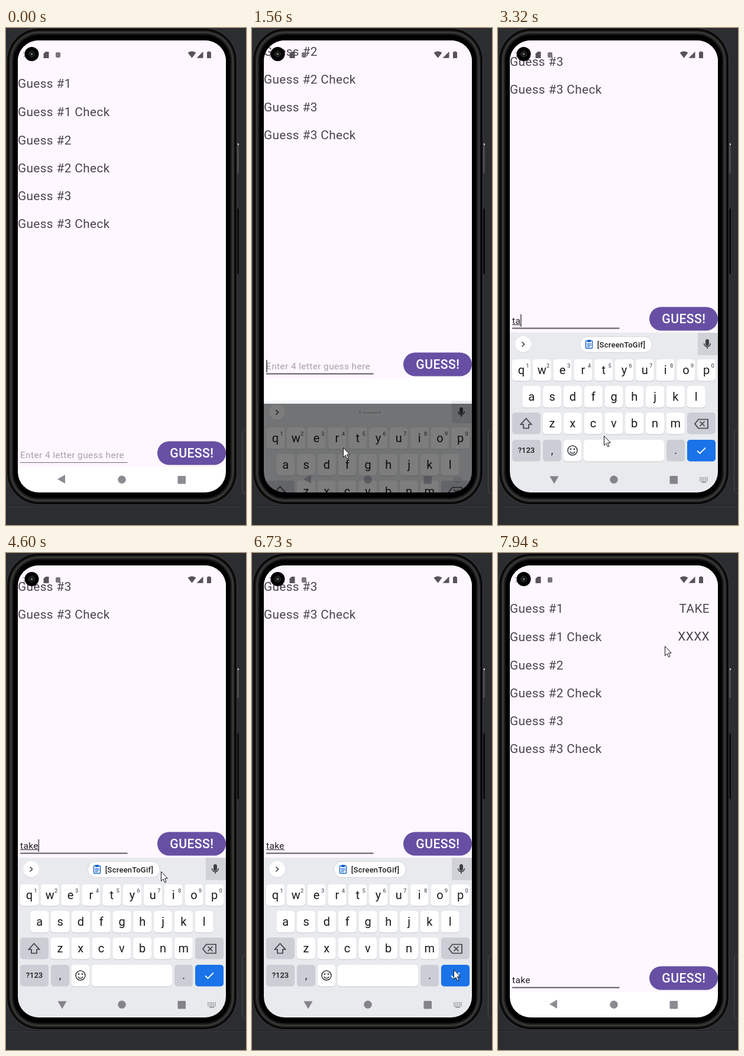
Recreate the animation shown at these times as an HTML page with a canvas. Size 406 px wide and 840 px high, loop 7990 ms.

```html
<!DOCTYPE html>
<html lang="en">
<head>
<meta charset="utf-8">
<title>Guess the word</title>
<style>
html, body { margin: 0; width: 100%; height: 100%; overflow: hidden; background: #2b2d30; }
canvas { display: block; }
</style>
</head>
<body>
<canvas id="stage" width="406" height="840"></canvas>
<script>
const LOOP = 7990, PAN = 227, KEYBOARD_HEIGHT = 269;
const stage = document.getElementById('stage').getContext('2d');
const layer = document.createElement('canvas');
layer.width = 406;
layer.height = 840;
const keyboard = layer.getContext('2d');
let g = stage;

const clamp = v => Math.max(0, Math.min(1, v));
const ramp = (t, from, to) => clamp((t - from) / (to - from));

// cubic-bezier(.4, 0, .2, 1)
function ease(x) {
  let lo = 0, hi = 1;
  for (let i = 0; i < 18; i++) {
    const s = (lo + hi) / 2, r = 1 - s;
    if (1.2 * r * r * s + 0.6 * r * s * s + s * s * s < x) lo = s; else hi = s;
  }
  return 3 * lo * lo - 2 * lo ** 3;
}

function box(x, y, w, h, r, fill, stroke, width) {
  g.beginPath();
  g.roundRect(x, y, w, h, r);
  paint(fill, stroke, width);
}

function disc(x, y, r, fill, stroke, width) {
  g.beginPath();
  g.arc(x, y, r, 0, 7);
  paint(fill, stroke, width);
}

function paint(fill, stroke, width = 1) {
  if (fill) { g.fillStyle = fill; g.fill(); }
  if (stroke) { g.strokeStyle = stroke; g.lineWidth = width; g.stroke(); }
}

function shape(d, x, y, fill, stroke, width = 1) {
  const path = new Path2D(d);
  g.save();
  g.translate(x, y);
  g.lineWidth = width;
  if (fill) { g.fillStyle = fill; g.fill(path); }
  if (stroke) { g.strokeStyle = stroke; g.stroke(path); }
  g.restore();
}

function text(s, x, y, size, color, { align = 'left', weight = 400, spacing = 0 } = {}) {
  g.font = `${weight} ${size}px Roboto, sans-serif`;
  g.letterSpacing = spacing + 'px';
  g.textAlign = align;
  g.fillStyle = color;
  g.fillText(s, x, y);
}

function drawPhone() {
  box(0, 0, 406, 840, 0, '#2b2d30');
  box(0, 807, 406, 1, 0, '#1e1f22');
  box(0, 808, 406, 1, 0, '#393b40');
  box(399.5, 679.5, 20, 107, 5, null, '#46484c');
  box(391, 195, 3, 50, 1, '#4a4a4a');
  box(392, 195, 2, 3, 1, '#ddd');
  box(391, 305, 3, 111, 1, '#0a0a0a');
  const rings = [[1, '#3c3d40'], [2, '#080808'], [5, '#1b1b1a'], [7, '#3d3c3a'], [9, '#2a2928'], [11, '#121211'], [13, '#000']];
  for (const [d, color] of rings) box(d, d - 1, 392 - 2 * d, 808 - 2 * d, 56 - d, color);
}

function drawField(t) {
  const typed = t >= 3920 ? 'take' : t >= 3850 ? 'tak' : t >= 3120 ? 'ta' : t >= 2990 ? 't' : '';
  const underlined = t >= 7110 ? 0 : t >= 4200 ? 31 : t >= 3920 ? 22 : t >= 3320 ? 14 : t >= 3120 ? 6 : 0;
  const focused = t >= 1160;
  text(typed || 'Enter 4 letter guess here', 24, 727, 15.4, typed ? '#1d1b20' : '#a59fa8', { spacing: 0.4 });
  if (underlined) box(24, 728, underlined, 1, 0, '#1d1b20');
  box(24, focused ? 733.6 : 734, 181.5, focused ? 1.8 : 1, 0, focused ? '#5f5867' : '#6f6a74');

  const blinkOff = [[2260, 2790], [4720, 5230], [5750, 6230], [6730, 7230], [7730, LOOP]];
  if (focused && !blinkOff.some(([a, b]) => t >= a && t < b)) {
    const caretX = 24 + [0, 6, 14, 22, 30.5][typed.length];
    box(caretX, 711, 1.6, 21, 0, '#4c4652');
  }
}

function drawButton(t) {
  box(256, 698.5, 116, 40, 20, '#6750a4');
  if (t >= 4990 && t < 5900) {
    g.save();
    g.clip();
    g.fillStyle = `rgba(255,255,255,${0.09 * ramp(t, 4980, 5080) * (1 - ramp(t, 5820, 5900))})`;
    g.fillRect(256, 698, 116, 41);
    disc(301, 708, 90 * ramp(t, 5150, 5400), `rgba(255,255,255,${0.1 * (1 - ramp(t, 5400, 5750))})`);
    g.restore();
  }
  text('GUESS!', 314.3, 726.3, 21.2, '#fff', { align: 'center', weight: 500, spacing: 0.4 });
}

function drawApp(t, pan) {
  const style = { spacing: 0.37 };
  g.save();
  g.translate(0, -pan);
  box(20, 0, 352, 785, 0, '#fff');
  box(20, 0, 352, 742, 0, '#fef7ff');
  [93, 141, 189, 236, 283, 330].forEach((y, i) => {
    text(`Guess #${(i >> 1) + 1}${i % 2 ? ' Check' : ''}`, 20, y + 8, 20.8, '#49454f', style);
  });
  if (t >= 5300) {
    text('TAKE', 358, 101, 20.8, '#49454f', { ...style, align: 'right' });
    text('XXXX', 358, 148, 20.8, '#49454f', { ...style, align: 'right' });
  }
  drawField(t);
  drawButton(t);
  g.restore();
}

function key(x, y, w, label, color = '#fff', size = 20, weight = 400) {
  if (color === '#fff') box(x, y + 1, w, 36.5, 5, '#c3c6cb');
  box(x, y, w, 36.5, 5, color);
  if (label) text(label, x + w / 2, y + 18 + size * 0.34, size, '#1a1a1a', { align: 'center', weight });
}

function drawChip(scale) {
  g.save();
  g.globalAlpha = scale;
  g.translate(199.5, 535);
  g.scale(scale, scale);
  box(-61, -13.5, 122, 27, 13.5, '#fff', '#d3d5da');
  box(-51, -6.5, 11, 13, 1.5, null, '#1a66d0', 1.5);
  box(-48.5, -8, 6, 4, 1, '#1a66d0');
  for (const y of [-2, 0.5, 3]) box(-49, y, y > 2 ? 5 : 7, 1.3, 0, '#1a66d0');
  text('[ScreenToGif]', 9, 4.6, 13, '#1f1f1f', { align: 'center', weight: 500, spacing: 0.25 });
  g.restore();
}

function drawKeyboard(t) {
  const gray = '#cbced5', ink = '#3c4043';
  g = keyboard;
  g.clearRect(0, 0, 406, 840);
  box(20, 515, 352, 325, 0, '#e8eaed');
  disc(42.5, 535.5, 13.5, '#cfd1d5');
  disc(42.5, 534.5, 13.5, '#fff');
  shape('M-2 -4L2 0L-2 4', 42.5, 534.5, null, ink, 1.6);
  if (t < 7110) drawChip(ramp(t, 1510, 1645));
  box(338, 515, 34, 38, 0, '#d0d2d8');
  box(351, 526, 6, 11, 3, ink);
  shape('M-5.5 -1A5.5 5.5 0 0 0 5.5 -1M0 4.5V8', 354, 534, null, ink, 1.6);

  [['qwertyuiop', 24, 560], ['asdfghjkl', 41.3, 605], ['zxcvbnm', 76, 650]].forEach(([row, x, y], r) => {
    [...row].forEach((letter, i) => {
      key(x + 34.8 * i, y, 31, letter);
      if (r === 0) text((i + 1) % 10, x + 34.8 * i + 26, y + 14, 9.5, '#5f6368', { align: 'center', weight: 500 });
    });
  });
  key(24, 650, 48, '', gray);
  shape('M0 -9L9 1H4.5V7.5H-4.5V1H-9Z', 47.5, 669, null, ink, 1.7);
  key(320, 650, 48, '', gray);
  shape('M-11 0L-5 -7.5H11V7.5H-5ZM-2.5 -4L5.5 4M5.5 -4L-2.5 4', 344, 669, null, ink, 1.7);
  key(24, 696, 48, '?123', gray, 13, 500);
  key(76, 696, 31, ',', gray, 18);
  key(111, 696, 30, '');
  disc(126, 714, 8, null, ink, 1.6);
  disc(123, 711.7, 1.4, ink);
  disc(129, 711.7, 1.4, ink);
  shape('M-4 2A4.3 4.3 0 0 0 4 2', 126, 714, null, ink, 1.6);
  key(145, 696, 136, '');
  key(285, 696, 31, '.', gray, 18);
  key(320, 696, 48, '', '#1a73e8');
  shape('M-7 0L-2.5 4.5L7 -5', 344, 714.5, null, '#fff', 1.8);
  g = stage;
}

function drawStatusBar() {
  const ink = '#57525b';
  text('7:31', 28, 50, 13, '#8d8790');
  shape('M-1 -5.5H4.5V5.5H-4.5V-2Z', 68, 45.5, ink);
  box(84, 41, 8, 9, 2, '#7b757e');
  shape('M-7 -3Q0 -8 7 -3L0 6Z', 314.5, 44.8, ink);
  shape('M5.5 -5.5V5.5H-5.5Z', 328, 45.3, ink);
  shape('M-1.5 -6H1.5V-5H3.5V5.5H-3.5V-5H-1.5Z', 343.5, 45.5, ink);
  disc(43.5, 44, 12, '#000');
  disc(43.5, 44, 5, '#17191b', '#2c2f31');
  disc(43.5, 44, 1.6, '#85898a');
}

function drawNavigation(t) {
  const ink = 'rgba(75,72,82,.63)';
  const turn = ramp(t, 1560, 1770) - ramp(t, 7300, 7500);
  g.save();
  g.translate(95, 762.5);
  g.rotate(turn * Math.PI * 1.5);
  shape('M-8 0L5 -7.5V7.5Z', 0, 0, ink);
  g.restore();
  disc(196, 763.3, 6.7, ink);
  box(290.5, 757, 13.5, 13.5, 1, ink);
  if (t > 1540 && t < 7110) {
    for (let i = 0; i < 15; i++) box(341 + (i % 5) * 3, 759.5 + Math.floor(i / 5) * 2.6, 1.8, 1.5, 0, ink);
    box(344, 767, 8, 1.4, 0, ink);
  }
}

const pointerPath = [
  [190, 354, 822], [400, 304, 748], [600, 222, 694], [780, 165, 679], [960, 150, 702],
  [1290, 155, 709], [1560, 155, 709], [1700, 180, 689], [4330, 180, 689], [4720, 300, 472],
  [5060, 301, 468], [5400, 301, 479], [5780, 301, 479], [6310, 342, 704], [7400, 342, 704],
  [7650, 300, 400], [7860, 267, 182], [7940, 283, 157]
];

function drawPointer(t) {
  if (t < 190) return;
  const next = pointerPath.findIndex(p => p[0] > t);
  const b = next < 0 ? pointerPath.at(-1) : pointerPath[next];
  const a = next < 0 ? b : pointerPath[next - 1];
  const k = ramp(t, a[0], b[0] + (a === b));
  const x = Math.round(a[1] + (b[1] - a[1]) * k), y = Math.round(a[2] + (b[2] - a[2]) * k);
  shape('M.5 .5V16.5L4 13L6.5 18.8L9 17.8L6.5 12H11.3Z', x - 1, y, '#fff', '#111');
}

function draw(t) {
  const pan = PAN * (ease(ramp(t, 1434, 1734)) - ease(ramp(t, 7148, 7448)));
  const hide = ramp(t, 7180, 7395);
  const drop = KEYBOARD_HEIGHT * (1 - ease(ramp(t, 1447, 1747)) + hide ** 2.4);
  const opacity = ramp(t, 1490, 1635) * (1 - hide);

  drawPhone();
  g.save();
  g.beginPath();
  g.roundRect(20, 21, 352, 764, 35);
  g.clip();
  box(20, 21, 352, 764, 0, '#000');
  drawApp(t, Math.round(pan));
  if (opacity) {
    drawKeyboard(t);
    g.globalAlpha = opacity;
    g.drawImage(layer, 0, Math.round(drop));
    g.globalAlpha = 1;
  }
  drawNavigation(t);
  drawStatusBar();
  g.restore();
  drawPointer(t);
}

const start = performance.now();
function frame() {
  draw((performance.now() - start) % LOOP);
  requestAnimationFrame(frame);
}
frame();
</script>
</body>
</html>
```
